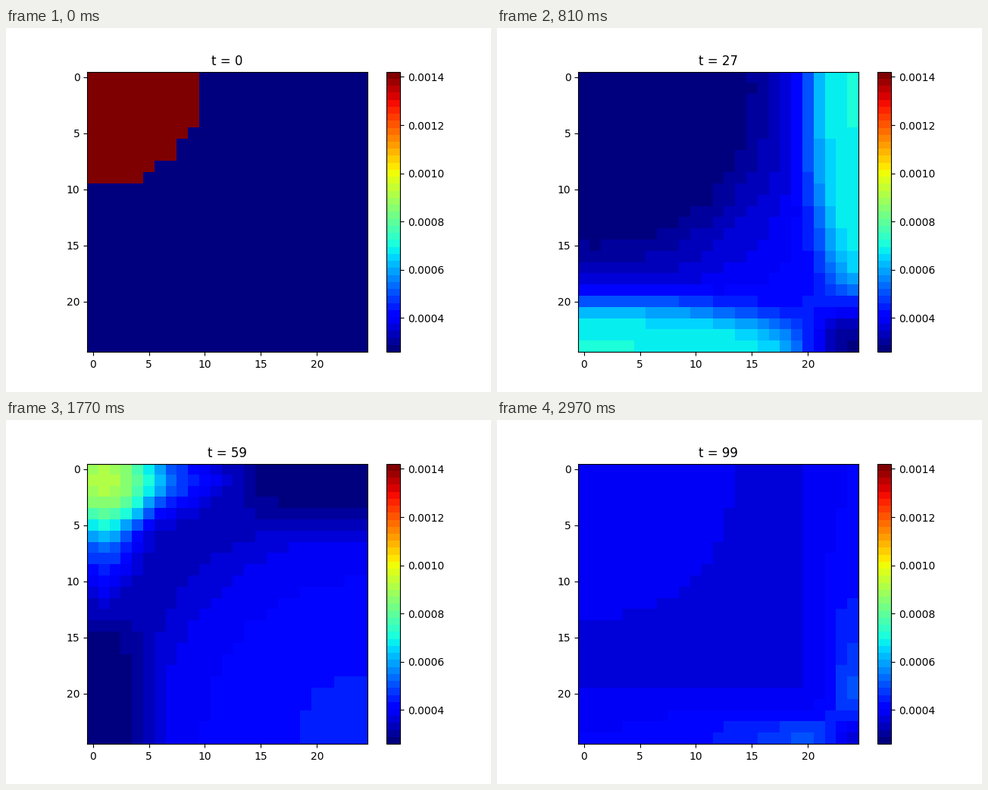
Write a matplotlib script that moves like this. It is 640x480 px and loops after 3000 ms.

```python
import numpy as np
import matplotlib.pyplot as plt
from matplotlib.animation import FuncAnimation

SIZE = 25
STEPS = 100
RADIUS = 10
LOW, HIGH = 0.0002587, 0.0014217
TAU = 1.0

# Nine-velocity lattice: (row shift, column shift) and weight
VELOCITIES = [(i, j) for i in (-1, 0, 1) for j in (-1, 0, 1)]
WEIGHTS = [(4 / 9, 1 / 9, 1 / 36)[abs(i) + abs(j)] for i, j in VELOCITIES]

# Reflecting walls lie on nodes 1 and SIZE - 1: unfold them into a periodic
# grid, and fold that grid back into the visible one
UNFOLD = np.r_[1:SIZE, SIZE - 2:1:-1]
FOLD = np.abs(np.arange(SIZE) - 1)


def equilibrium(rho, uy, ux):
    square = 1.5 * (uy**2 + ux**2)
    result = []
    for (i, j), w in zip(VELOCITIES, WEIGHTS):
        along = 3 * (i * uy + j * ux)
        result.append(w * rho * (1 + along + along**2 / 2 - square))
    return np.array(result)


def moments(f):
    rho = f.sum(axis=0)
    uy = sum(i * part for (i, _), part in zip(VELOCITIES, f)) / rho
    ux = sum(j * part for (_, j), part in zip(VELOCITIES, f)) / rho
    return rho, uy, ux


def simulate():
    y, x = np.mgrid[:SIZE, :SIZE]
    start = np.where(x**2 + y**2 < RADIUS**2, HIGH, LOW)
    rho = start[np.ix_(UNFOLD, UNFOLD)]
    f = equilibrium(rho, 0 * rho, 0 * rho)
    history = []
    for _ in range(STEPS):
        rho, uy, ux = moments(f)
        history.append(rho[np.ix_(FOLD, FOLD)])
        f += (equilibrium(rho, uy, ux) - f) / TAU
        f = np.array([np.roll(part, shift, axis=(0, 1))
                      for part, shift in zip(f, VELOCITIES)])
    return history


density = simulate()

fig, ax = plt.subplots(figsize=(6.4, 4.8), dpi=100)
image = ax.imshow(density[0], cmap=plt.get_cmap("jet", 40),
                  vmin=LOW, vmax=HIGH)
fig.colorbar(image, ax=ax)
title = ax.set_title("t = 0")


def update(t):
    image.set_data(density[t])
    title.set_text(f"t = {t}")
    return image, title


anim = FuncAnimation(fig, update, frames=STEPS, interval=30,
                     repeat=True, repeat_delay=0, blit=False)
plt.show()
```
